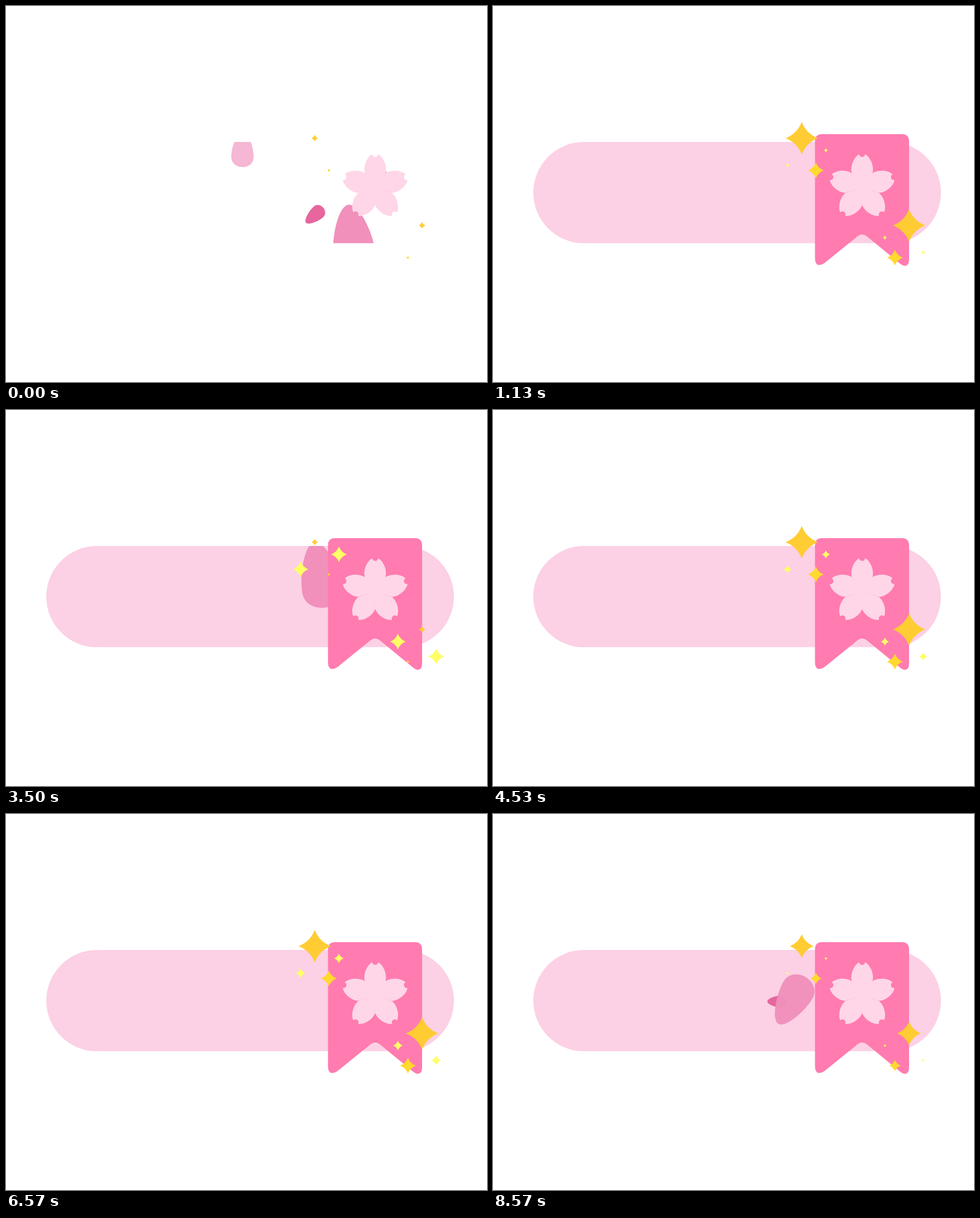
An HTML page with a canvas for the animation above (8610 ms loop, 800 by 625 pixels).

```html
<!DOCTYPE html>
<html lang="en">
<head>
<meta charset="utf-8">
<title>Blossom banner</title>
<style>
html, body { margin: 0; width: 100%; height: 100%; overflow: hidden; background: #fff; }
canvas { display: block; }
</style>
</head>
<body>
<canvas id="stage" width="800" height="625"></canvas>
<script>
const ctx = document.getElementById('stage').getContext('2d');
const LOOP = 8610;
const TOP = 226, HEIGHT = 168.5;
const clamp = v => Math.max(0, Math.min(1, v));
const smooth = u => u * u * (3 - 2 * u);
const wave = (t, period) => (1 - Math.cos(2 * Math.PI * t / period)) / 2;

const pill = new Path2D();
pill.roundRect(67, TOP, 678, HEIGHT, HEIGHT / 2);

const ribbon = new Path2D(
  'M547 213H680Q692 213 692 225V421Q692 432 685 432Q682 432 678 429' +
  'L622 383Q614 376.5 606 383L553 426Q547 430.5 542 430.5Q535.5 430 535.5 419V225Q535.5 213 547 213Z');

const flowerPetal = new Path2D(
  'M0 0L-17.6-24.3C-20.5-35-15-50-5.5-56L-3.2-52.5L0-51.5L3.2-52.5L5.5-56C15-50 20.5-35 17.6-24.3Z');
const flower = new Path2D();
for (let i = 0; i < 5; i++) flower.addPath(flowerPetal, new DOMMatrix().rotate(72 * i));

const loosePetal = new Path2D(
  'M-1 0C-1-.5 0-1 .5-.95C.85-.9 1-.4 1 0C1 .4.85.9.5.95C0 1-1 .5-1 0Z');

const star = new Path2D('M0-1Q.28-.28 1 0Q.28.28 0 1Q-.28.28-1 0Q-.28-.28 0-1Z');

// One pose of each petal: time, x, y, size, angle
const petals = [
  [0, 394, 238, 30, 1.57],
  [0, 577, 386, 56, 1.45],
  [0, 623, 305, 32, -1.6],
  [0, 514, 348, 19, -.72],
  [3500, 523, 274, 55, 1.4],
  [5670, 686, 273, 25, 0],
  [8570, 473, 312, 16, 0],
  [8570, 498, 310, 45, -1.05]
];

function shape(path, colour, x, y, sx = 1, sy = sx, angle = 0) {
  ctx.save();
  ctx.translate(x, y);
  ctx.rotate(angle);
  ctx.scale(sx, sy);
  ctx.fillStyle = colour;
  ctx.fill(path);
  ctx.restore();
}

// Petals blow left, small ones rise faster, large pale ones fade on the way
function drawPetal(t, [t0, x0, y0, size, angle]) {
  const dt = t - t0;
  const x = x0 - .705 * dt, y = y0 - 4 / size * dt;
  const dark = size < 28;
  ctx.globalAlpha = dark ? 1 : clamp((x - 180) / 330);
  shape(loosePetal, dark ? '#e6669d' : '#f090bb', x, y, size, size * .65, angle + .0033 * dt);
}

function drawPill(t) {
  ctx.save();
  ctx.beginPath();
  ctx.rect(0, TOP, 800, HEIGHT);
  ctx.clip();
  shape(pill, '#fcd0e5', 0, 170 * (1 - clamp(t / 660)) ** 3);
  ctx.clip(pill);
  for (const petal of petals) drawPetal(t, petal);
  ctx.restore();
}

function drawRibbon(t) {
  ctx.save();
  ctx.beginPath();
  ctx.rect(530, 213, 170, 219 * smooth(clamp(t / 785)));
  ctx.clip();
  shape(ribbon, '#ff7bb0', 0, 0);
  ctx.restore();
  shape(flower, '#fed6e8', 614, 301.5, .98);
}

// The lower cluster mirrors the upper one
function drawStarPair(x, y, size, colour) {
  if (size < .8) return;
  shape(star, colour, x, y, size);
  shape(star, colour, 1205.5 - x, y + 145, size);
}

function drawStars(t) {
  const quick = Math.min(1, .2 + 1.09 * wave(t, 700));
  const slow = wave(t + 30, 1400);
  drawStarPair(513.5, 219.7, 27 * quick, '#ffcc33');
  drawStarPair(537, 273.3, 13 * quick, '#ffd92e');
  drawStarPair(553.7, 240, 13 * slow, '#ffff66');
  drawStarPair(490, 264.7, 13 * slow, '#ffff66');
}

const start = performance.now();
function frame() {
  const t = (performance.now() - start) % LOOP;
  ctx.clearRect(0, 0, 800, 625);
  drawPill(t);
  drawRibbon(t);
  drawStars(t);
  requestAnimationFrame(frame);
}
frame();
</script>
</body>
</html>
```
